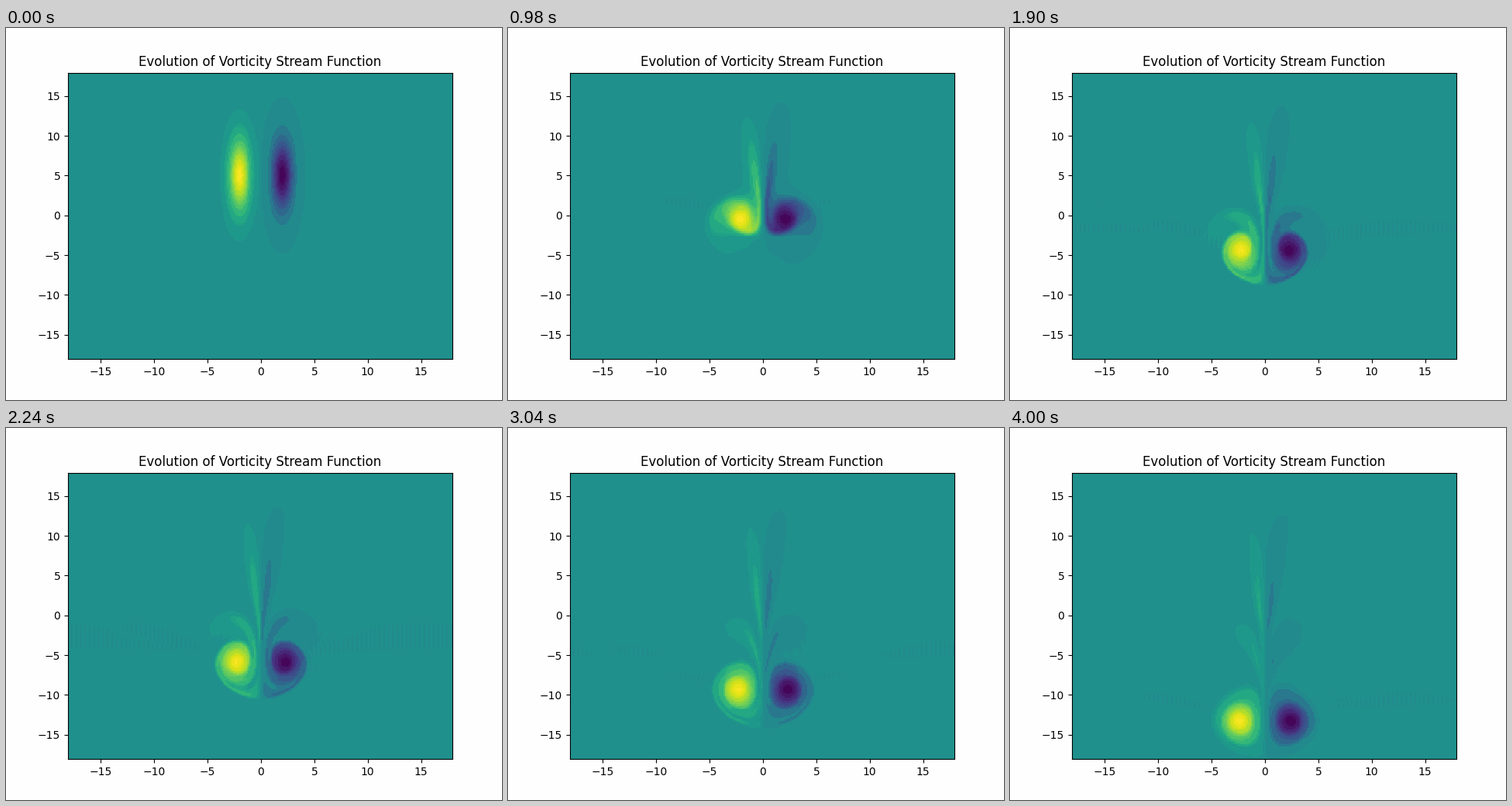
Write a matplotlib script that moves like this. It is 640x480 px and loops after 4020 ms.

```python
import numpy as np
import matplotlib.pyplot as plt
from matplotlib.animation import FuncAnimation

N, SIZE = 256, 36.0          # grid points and width of the periodic box
FRAMES, DT, SUBSTEPS = 201, 0.25, 2
NU = 0.001

h = SIZE / N
x = -SIZE / 2 + h * np.arange(N)
X, Y = np.meshgrid(x, x)
flip = -np.arange(N) % N     # index of -x on the grid

kx = 2 * np.pi * np.fft.rfftfreq(N, h)[None, :]
ky = 2 * np.pi * np.fft.fftfreq(N, h)[:, None]
k2 = kx**2 + ky**2
cut = 2 / 3 * np.pi / h
keep = (kx < cut) & (abs(ky) < cut)
to_grad = 1j * (kx + ky) * keep
to_flow = -to_grad / np.where(k2 == 0, 1, k2)
damping = NU * k2
half_keep = keep / 2


def rate(w):
    """Advection and diffusion of vorticity that is odd in x.

    The odd symmetry lets one transform carry both derivatives of a field.
    """
    flow = np.fft.irfft2(to_flow * w)
    grad = np.fft.irfft2(to_grad * w)
    p = flow[:, flip] * grad
    return half_keep * np.fft.rfft2(p - p[:, flip]) - damping * w


def step(w, dt):
    a = rate(w)
    b = rate(w + dt / 2 * a)
    c = rate(w + dt / 2 * b)
    d = rate(w + dt * c)
    return w + dt / 6 * (a + 2 * b + 2 * c + d)


def shades(w):
    lo, hi = w.min(), w.max()
    return np.clip((w - lo) / (hi - lo) * 256, 0, 255).astype(np.uint8)


def vortex(cx, cy):
    return np.exp(-(X - cx)**2 - (Y - cy)**2 / 20)


def simulate():
    w = np.fft.rfft2(vortex(-2, 5) - vortex(2, 5)) * keep
    states = [shades(np.fft.irfft2(w))]
    for _ in range(FRAMES - 1):
        for _ in range(SUBSTEPS):
            w = step(w, DT / SUBSTEPS)
        states.append(shades(np.fft.irfft2(w)))
    return states


def banded_viridis():
    """Viridis merged into coarse colour cells, each shown by its mean."""
    rgb = np.round(plt.get_cmap("viridis")(np.arange(256))[:, :3] * 255)
    cells = rgb // [32, 16, 32]
    weight = 1 / abs(np.arange(256) - 127.5)
    bands = np.empty((256, 3), np.uint8)
    for cell in np.unique(cells, axis=0):
        same = (cells == cell).all(axis=1)
        bands[same] = np.average(rgb[same], axis=0, weights=weight[same])
    return bands


palette = banded_viridis()
states = simulate()

fig, ax = plt.subplots(figsize=(6.4, 4.8), dpi=100, facecolor="#fefefe")
edges = (x[0] - h / 2, x[-1] + h / 2)
image = ax.imshow(palette[states[0]], origin="lower", extent=edges * 2,
                  aspect="auto", interpolation="nearest")
ax.set_title("Evolution of Vorticity Stream Function")


def draw(i):
    image.set_data(palette[states[i]])
    return [image]


anim = FuncAnimation(fig, draw, frames=FRAMES, interval=20, repeat=True)
plt.show()
```
